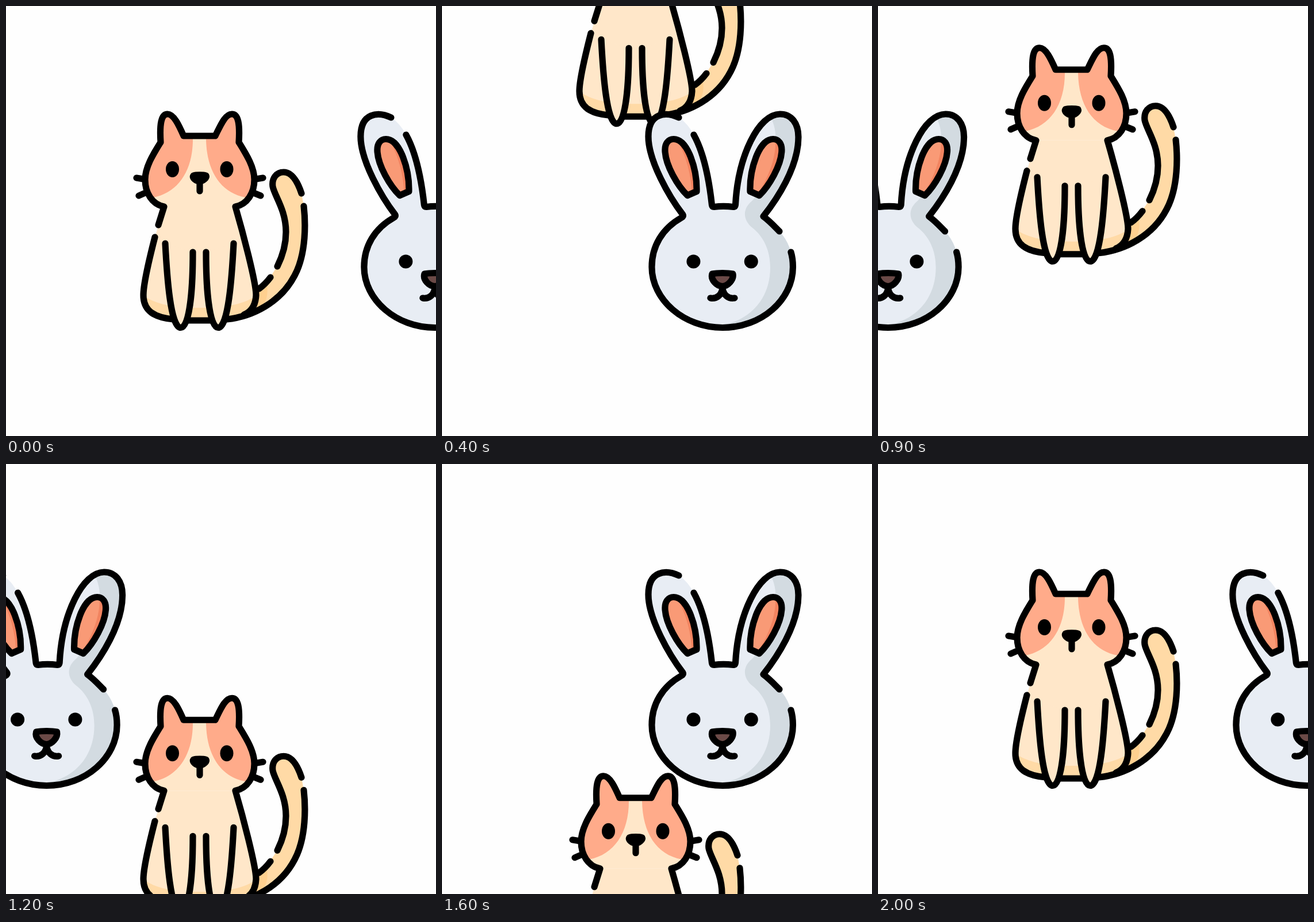
An HTML page without scripts that plays this animation: 748 by 748 pixels, repeating every 2100 ms.

```html
<!DOCTYPE html>
<html lang="en">
<head>
<meta charset="utf-8">
<title>Cat and rabbit</title>
<style>
@property --a {
  syntax: "<angle>";
  inherits: true;
  initial-value: 0deg;
}
html, body {
  margin: 0;
  width: 100%;
  height: 100%;
  overflow: hidden;
  background: #fefefe;
}
svg {
  display: block;
  width: 100%;
  height: 100%;
  /* 21 held poses per loop; the last one equals the first */
  animation: turn 2100ms steps(21, jump-none) -5ms infinite;
}
@keyframes turn {
  from { --a: 0deg; }
  to { --a: 360deg; }
}
.cat { transform: translateY(calc(-373px * sin(var(--a)))); }
.rabbit { transform: translateX(calc(115.6px + 373.3px * cos(var(--a)))); }
.line {
  fill: none;
  stroke: #000;
  stroke-width: 11.2;
  stroke-linecap: round;
  stroke-linejoin: round;
}
.cream { fill: #ffe7c9; }
.tan { fill: #ffdaa6; }
.salmon { fill: #ffab8a; }
.fur { fill: #e8edf4; }
.shade { fill: #d3dbe1; }
</style>
</head>
<body>
<svg viewBox="0 0 748 748">
  <defs>
    <clipPath id="head">
      <path id="face" d="M269 237C267 205 270 188 281 188C292 188 301 208 309 226H364C373 208 381 188 393 188C404 188 407 205 405 237C418 258 432 280 432 302C432 325 420 345 399 349H275C254 345 242 325 242 302C242 280 256 258 269 237Z"/>
    </clipPath>
    <clipPath id="torso">
      <path id="body" d="M275 349L259 402C250 437 239 483 239 503C239 535 262 547 337 547C412 547 434 532 435 503C435 480 411 390 399 349Z"/>
    </clipPath>
    <clipPath id="pelt">
      <path id="coat" d="M181 194C158 183 128 186 128 227C128 270 165 333 189 365C152 385 134 418 134 454C134 511 190 559.5 257 559.5C325 559.5 379.5 511 379.5 454C379.5 430 371 408 356 392C347 383 339 374 328 366C351 337 389 281 389 228C389 204 377 188 357 188C320 188 284 260 279 349C265 348 252 348 239 349C234 305 226 258 207 224C200 211 192 201 181 194Z"/>
    </clipPath>
    <path id="leg" d="M277 413C280 470 286 559.5 304 559.5C320 559.5 325 488 325 428"/>
    <path id="pad" d="M196 329.5L212 322.5C213 285 197 231.5 172 231.5C162 231.5 157 240 157 250C157 277 180 314 196 329.5Z"/>
    <clipPath id="padL"><use href="#pad"/></clipPath>
    <clipPath id="padR"><use href="#pad" transform="matrix(-1 0 0 1 517 0)"/></clipPath>
  </defs>

  <g class="cat">
    <path class="tan" d="M384 545C430 540 478 515 502 469C523 430 521 375 518 348L514 326C506 302 496 289 483 289C471 289 462 299 464 314C467 330 487 355 487 393C487 430 470 468 436 494Z"/>
    <path d="M436 493L453 481C456 496 455 508 449 517L430 530Z" fill="#ffd08f"/>
    <use href="#body" class="cream"/>
    <path class="tan" clip-path="url(#torso)" d="M235 500C258 521 300 525 337 525C374 525 416 521 440 500V555H235Z"/>
    <g class="cream">
      <use href="#leg"/>
      <use href="#leg" transform="matrix(-1 0 0 1 673 0)"/>
      <use href="#face"/>
    </g>
    <path class="salmon" clip-path="url(#head)" d="M325 180V232C325 287 299 325 256 333L230 330V180ZM348 180V232C349 287 373 325 417 333L444 330V180Z"/>
    <g class="line">
      <path d="M265 381L275 349C254 345 242 325 242 302C242 280 256 258 269 237C267 205 270 188 281 188C292 188 301 208 309 226H364C373 208 381 188 393 188C404 188 407 205 405 237C418 258 432 280 432 302C432 325 420 345 399 349C411 390 435 480 435 503C434 522 426 532 414 537"/>
      <path d="M259 402C250 437 239 483 239 503C239 531 259 542 291 545M316 547H357"/>
      <use href="#leg"/>
      <use href="#leg" transform="matrix(-1 0 0 1 673 0)"/>
      <path d="M514 326C506 302 496 289 483 289C471 289 462 299 464 314C467 330 487 355 487 393C487 415 480 437 472 453M460 472C454 480 447 487 440 492M518 348C521 375 523 430 502 469C478 515 430 540 384 545"/>
      <path d="M227 299L239 301M231 330L240 326M447 299L435 301M443 330L433 326M337 305V322"/>
      <path d="M326 295C331 293.5 343 293.5 348 295C350 299 342 305 337 305C331 305 323 299 326 295Z" fill="#000"/>
    </g>
    <ellipse cx="289.5" cy="284" rx="11.5" ry="14"/>
    <ellipse cx="384" cy="284" rx="11.5" ry="14"/>
  </g>

  <g class="rabbit">
    <use href="#coat" class="fur"/>
    <path class="shade" clip-path="url(#pelt)" d="M336 185C347 202 351 220 349 240C343 290 325 325 305 342C292 355 293 372 308 385C330 402 340 427 340 455C340 508 307 546 254 556V570H400V185Z"/>
    <g fill="#f99a76">
      <use href="#pad"/>
      <use href="#pad" transform="matrix(-1 0 0 1 517 0)"/>
    </g>
    <g fill="#f28460">
      <path clip-path="url(#padL)" d="M176 230C192 255 203 292 204 330H222V230Z"/>
      <path clip-path="url(#padR)" d="M349 230C351 262 338 298 315 332H370V230Z"/>
    </g>
    <g class="line">
      <path d="M181 194C158 183 128 186 128 227C128 270 165 333 188 363Q189.5 366 186 368C152 387 134 418 134 454C134 511 190 559.5 257 559.5C325 559.5 379.5 511 379.5 454C379.5 445 378.5 436 376 428"/>
      <path d="M356 392C347 383 339 374 328 366C351 337 389 281 389 228C389 204 377 188 357 188C320 188 284 260 279.5 346Q279 349.5 276 349.5C264 348 253 348 242 349.5Q239 349.5 238.5 346C234 305 226 258 207 224"/>
      <use href="#pad"/>
      <use href="#pad" transform="matrix(-1 0 0 1 517 0)"/>
      <path d="M236 508C246 510 257 503 257 488C257 503 268 510 278 508"/>
      <path d="M239 466C248 464 266 464 275 466C277 476 266 487.5 257 487.5C247 487.5 236 476 239 466Z" fill="#6b4a47"/>
    </g>
    <circle cx="206.5" cy="444.5" r="12"/>
    <circle cx="306.8" cy="444.5" r="12"/>
  </g>
</svg>
</body>
</html>
```
